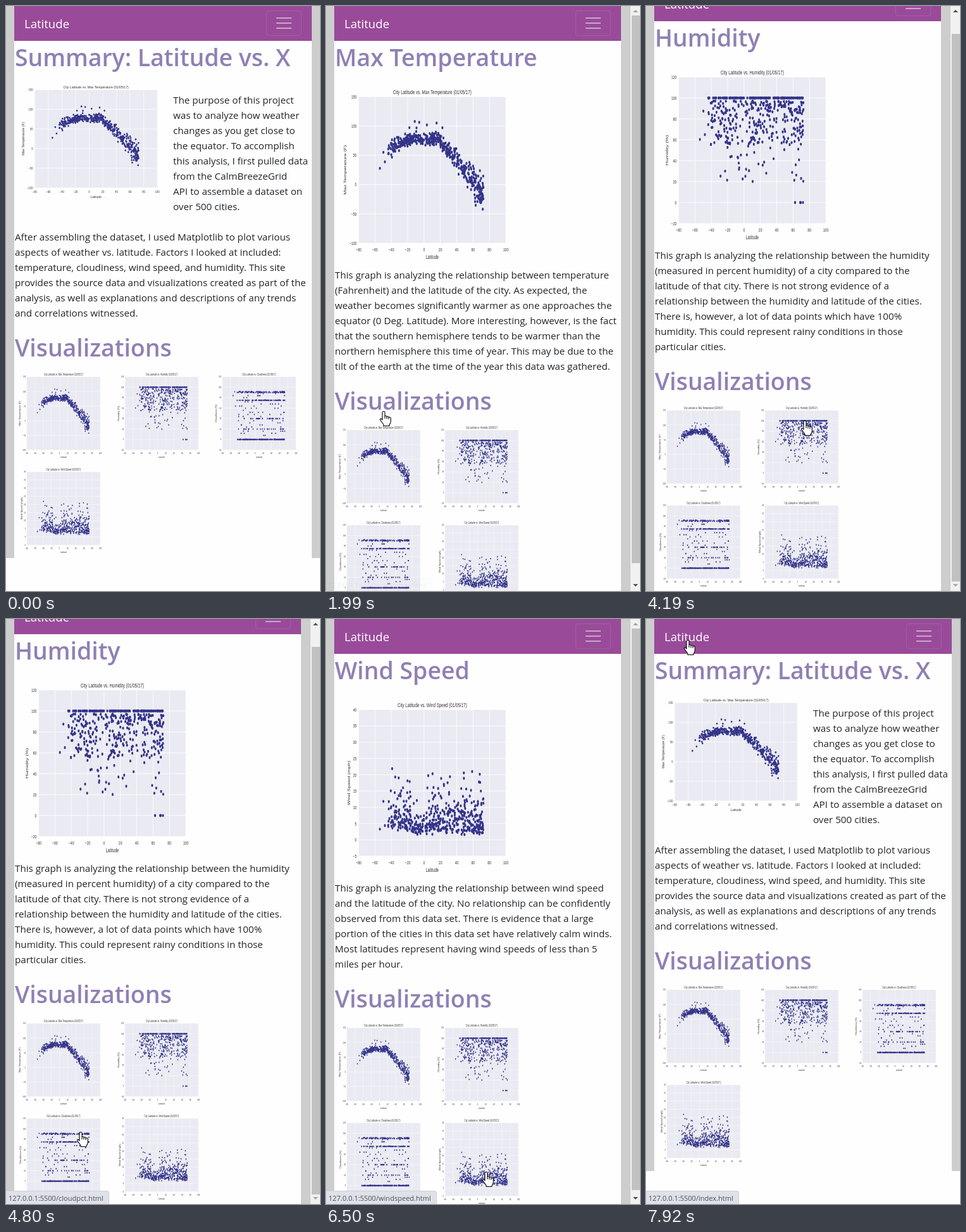
An HTML page that plays this animation: 496x923 px, repeating every 8 s.

```html
<!DOCTYPE html>
<html lang="en">
<head>
<meta charset="utf-8">
<title>Latitude</title>
<style>
html, body { margin: 0; width: 100%; height: 100%; overflow: hidden; background: #fefefe; }
#stage { position: relative; width: 496px; height: 923px; overflow: hidden; background: #fefefe;
  font: 15.2px/24px "Open Sans", "Noto Sans", sans-serif; color: #212529; }
#stage div, #stage svg { position: absolute; white-space: nowrap; }
.page { left: 0; top: 0; width: 496px; height: 1000px; }
.side { top: 0; background: #cdcdcd; }
.nav { left: 13px; top: 0; height: 55px; background: #994b99; }
.brand { left: 16px; top: 12.7px; font-size: 18.6px; line-height: 30px; color: #fff; }
.toggle { right: 16px; top: 7px; width: 54px; height: 38px; border: 1px solid rgba(255,255,255,.1); border-radius: 4px; }
.toggle div { left: 15px; width: 24px; height: 2px; background: rgba(255,255,255,.5); }
.h { left: 14px; font-size: 37.4px; line-height: 48px; font-weight: 600; color: #9080b4; }
#bar { left: 481px; top: 0; width: 15px; height: 923px; background: #f1f1f1; }
#thumb { left: 2px; width: 13px; background: #c1c1c1; }
#status { left: 0; top: 902px; height: 21px; padding: 0 8px 0 4px; background: #dee2e8;
  border: 1px solid #cfd2d8; border-width: 1px 1px 0 0; border-radius: 0 4px 0 0; box-sizing: border-box;
  font-size: 11.05px; line-height: 21px; color: #4d5156; }
#over { left: 0; top: 0; }
</style>
</head>
<body>
<div id="stage"></div>
<script>
const LOOP = 8000;
const stage = document.getElementById('stage');
const clamp = (v, a, b) => Math.min(b, Math.max(a, v));

// --- weather data -------------------------------------------------
let seed = 20170;
const rnd = () => {
  seed = (seed + 0x6D2B79F5) | 0;
  let v = Math.imul(seed ^ (seed >>> 15), 1 | seed);
  v = (v + Math.imul(v ^ (v >>> 7), 61 | v)) ^ v;
  return ((v ^ (v >>> 14)) >>> 0) / 4294967296;
};
const gauss = () => (rnd() + rnd() + rnd() + rnd() - 2) * 1.73;

function latitude() {
  return rnd() < .4 ? clamp(-15 + 17 * gauss(), -55, 20) : 73 - 68 * Math.pow(rnd(), 1.15);
}

function warmth(lat) {
  const north = Math.max(0, lat - 18), south = Math.max(0, -10 - lat);
  const odd = rnd() < .02 ? 25 : 0;
  return 78 - 1.75 * north - .018 * south * south + (5 + .17 * north + .08 * south) * gauss() + odd;
}

function moisture(lat) {
  if (lat > 62 && rnd() < .1) return 0;
  const r = rnd();
  return r < .27 && lat > -47 ? 100 : r < .93 ? 97 - 42 * Math.pow(rnd(), 1.4) : 20 + 38 * rnd();
}

function cover() {
  const r = rnd();
  if (r < .34) return 0;
  if (r < .5) return 75;
  if (r < .68) return 90 + Math.round(rnd()) * 1.5;
  if (r < .75) return r < .715 ? 20 : 40;
  return 4 * Math.floor(2 + 22 * rnd());
}

function breeze(lat) {
  const calm = Math.abs(lat + 6) < 10;
  const gale = lat > 45 && rnd() < .05 ? 12 * rnd() + 6 : 0;
  return (lat < -16 ? 2.6 : 1.4) + 1.6 * rnd() - (calm ? 2.6 : 4.8) * Math.log(1 - .98 * rnd()) + gale;
}

const cities = Array.from({ length: 490 }, latitude);

// --- charts -------------------------------------------------------
const AX = { l: 54, r: 388.8, t: 34.6, b: 256.4 };
const CHARTS = [
  { name: 'Max Temperature', unit: 'F', lo: -100, hi: 150, step: 50, yx: 26, value: warmth },
  { name: 'Humidity', unit: '%', lo: -20, hi: 120, step: 20, yx: 30, value: moisture },
  { name: 'Cloudiness', unit: '%', lo: -20, hi: 120, step: 20, yx: 30, value: cover },
  { name: 'Wind Speed', unit: 'mph', lo: -5, hi: 40, step: 5, yx: 34, value: breeze }
];

function symbol(c, id) {
  const px = v => (AX.l + (v + 80) / 180 * (AX.r - AX.l)).toFixed(1);
  const py = v => (AX.b - (v - c.lo) / (c.hi - c.lo) * (AX.b - AX.t)).toFixed(1);
  const label = v => String(v).replace('-', '\u2212');
  let grid = '', ticks = '';
  for (let v = -80; v <= 100; v += 20) {
    grid += `M${px(v)} ${AX.t}V${AX.b}`;
    ticks += `<text x="${px(v)}" y="268.5" text-anchor="middle">${label(v)}</text>`;
  }
  for (let v = c.lo; v <= c.hi; v += c.step) {
    grid += `M${AX.l} ${py(v)}H${AX.r}`;
    ticks += `<text x="49.5" y="${+py(v) + 2.7}" text-anchor="end">${label(v)}</text>`;
  }
  const dots = cities.map(lat => `M${px(lat)} ${py(c.value(lat))}h.01`).join('');
  return `<symbol id="chart${id}" viewBox="0 0 432 288" preserveAspectRatio="none">
    <rect x="${AX.l}" y="${AX.t}" width="${AX.r - AX.l}" height="${AX.b - AX.t}" fill="#eaeaf2"/>
    <path d="${grid}" stroke="#fff" stroke-width=".9"/>
    <path d="${dots}" fill="none" stroke="#0c0c74" stroke-opacity=".82" stroke-width="4.5" stroke-linecap="round"/>
    <g font-family="Liberation Sans, Arial, sans-serif" fill="#333" font-size="7.3">${ticks}
    <text x="221.4" y="31" font-size="8.95" text-anchor="middle">City Latitude vs. ${c.name} (01/05/17)</text>
    <text x="221.4" y="280" font-size="8.4" text-anchor="middle">Latitude</text>
    <text transform="translate(${c.yx} 145.5) rotate(-90)" font-size="8.1" text-anchor="middle">${c.name} (${c.unit})</text></g>
  </symbol>`;
}

const plot = (i, x, y, w, h) =>
  `<svg style="left:${x}px;top:${y}px" width="${w}" height="${h}"><use href="#chart${i}" width="${w}" height="${h}"/></svg>`;

// --- pages --------------------------------------------------------
const heading = (text, mid) => `<div class="h" style="top:${mid - 25}px">${text}</div>`;
const para = (lines, x, y) => `<div style="left:${x}px;top:${y}px">${lines.join('<br>')}</div>`;

function frame(right, height) {
  const bars = [10, 18, 26].map(y => `<div style="top:${y}px"></div>`).join('');
  return `<div class="side" style="left:0;width:13px;height:${height}px"></div>
    <div class="side" style="left:${right}px;width:${right > 480 ? 13 : 15}px;height:${height}px"></div>
    <div class="nav" style="width:${right - 13}px"><div class="brand">Latitude</div><div class="toggle">${bars}</div></div>`;
}

function gallery(end, cols) {
  const cells = CHARTS.map((c, i) =>
    plot(i, 14 + 154.5 * (i % cols), end + 70.5 + 150 * Math.floor(i / cols), 150, 150));
  return heading('Visualizations', end + 44) + cells.join('');
}

const summary = frame(483, 871) + heading('Summary: Latitude vs. X', 82) + plot(0, 14, 108, 250, 201) + para([
  'The purpose of this project', 'was to analyze how weather', 'changes as you get close to', 'the equator. To accomplish',
  'this analysis, I first pulled data', 'from the CalmBreezeGrid', 'API to assemble a dataset on', 'over 500 cities.'
], 264, 136) + para([
  'After assembling the dataset, I used Matplotlib to plot various', 'aspects of weather vs. latitude. Factors I looked at included:',
  'temperature, cloudiness, wind speed, and humidity. This site', 'provides the source data and visualizations created as part of the',
  'analysis, as well as explanations and descriptions of any trends', 'and correlations witnessed.'
], 14, 352) + gallery(496, 3);

const TEXTS = [[
  'This graph is analyzing the relationship between temperature', '(Fahrenheit) and the latitude of the city. As expected, the',
  'weather becomes significantly warmer as one approaches the', 'equator (0 Deg. Latitude). More interesting, however, is the fact',
  'that the southern hemisphere tends to be warmer than the', 'northern hemisphere this time of year. This may be due to the',
  'tilt of the earth at the time of the year this data was gathered.'
], [
  'This graph is analyzing the relationship between the humidity', '(measured in percent humidity) of a city compared to the',
  'latitude of that city. There is not strong evidence of a', 'relationship between the humidity and latitude of the cities.',
  'There is, however, a lot of data points which have 100%', 'humidity. This could represent rainy conditions in those', 'particular cities.'
], [
  'This graph is analyzing the relationship between the Cloudiness', 'percent and the latitude of the city. There is evidence of a weak',
  'positive correlation between cloudiness percent and latitude. A', 'large section of the data points are either above 75%',
  'cloudiness or are around 0% cloudiness. This suggests that if', 'there are not totally clear skies that there is a higher frequency',
  'of overcast or mostly-cloudy skies as opposed to partly-cloudy', 'skies.'
], [
  'This graph is analyzing the relationship between wind speed', 'and the latitude of the city. No relationship can be confidently',
  'observed from this data set. There is evidence that a large', 'portion of the cities in this data set have relatively calm winds.',
  'Most latitudes represent having wind speeds of less than 5', 'miles per hour.'
]];

const detail = (lines, i) => frame(466, 1000) + heading(CHARTS[i].name, 82) + plot(i, 14, 106.5, 300, 300)
  + para(lines, 14, 412) + gallery(412 + 24 * lines.length, 2);

const HAND = 'M-2 14V2Q-2 .5 0 .5Q2 .5 2 2V7.6Q4.3 7 5 8.8Q7.3 8 8 9.8Q11 9.2 11.3 11.5V16.5Q11 19.5 9 22V23.5H0V21.5L-5.5 14Q-5.6 11.6 -3.6 12.3Z';
const GRIP = 'M2 7.6V12M5 8.8V12.4M8 9.8V13';
const ARROW = 'M.5 .5V16.5L4.2 13L6.6 18.6L9 17.6L6.7 12.1H11.7Z';

stage.innerHTML = `<svg width="0" height="0">${CHARTS.map(symbol).join('')}</svg>`
  + [summary, ...TEXTS.map(detail)].map(p => `<div class="page">${p}</div>`).join('')
  + `<div id="bar"><div id="thumb"></div><svg width="15" height="923"><path id="up" d="M4 10H12L8 6Z"/><path id="down" d="M4 912H12L8 916Z"/></svg></div>
  <div id="status"></div>
  <svg id="over" width="496" height="923"><circle id="click" r="15" fill="#ff0" fill-opacity=".47"/>
  <g id="cursor" stroke="#000" stroke-width="1.1" stroke-linejoin="round" fill="#fff">
  <g id="hand"><path d="${HAND}"/><path d="${GRIP}"/></g><path id="arrow" d="${ARROW}"/></g></svg>`;

const el = id => document.getElementById(id);
const pages = [...document.querySelectorAll('.page')];

// --- timeline -----------------------------------------------------
// Each visit: the pointer travels, rests on a link, clicks, and a page loads.
const VISITS = [
  { file: 'maxtemp', page: 1, from: 450, to: 1220, hover: 1300, click: 1375, up: 1450, load: 1620,
    way: [[0, 471, 900], [1, 91, 639]], arrow: [0, .75] },
  { file: 'humidity', page: 2, from: 2370, to: 2550, hover: 2720, click: 3020, up: 3180, load: 3180,
    way: [[0, 91, 639], [1, 250, 731]] },
  { file: 'cloudpct', page: 3, from: 3790, to: 4560, hover: 4650, click: 4725, up: 4800, load: 4950,
    way: [[0, 250, 731], [.4, 251, 654], [.6, 251, 654], [1, 118, 809]], scroll: 31 },
  { file: 'windspeed', page: 4, from: 5410, to: 6210, hover: 5700, click: 6270, up: 6420, load: 6420,
    way: [[0, 118, 809], [.14, 185, 758], [.27, 228, 841], [1, 253, 872]] },
  { file: 'index', page: 0, from: 6740, to: 7530, hover: 7620, click: 7695, up: 7770, load: 7845,
    way: [[0, 253, 872], [.35, 313, 560], [1, 66, 33]], arrow: [.2, .95] }
];
const FADE = 140, LINGER = 240, BEAT = 80;

// the pointer advances in even steps of about one beat
function progress(v, t) {
  const steps = Math.round((v.to - v.from) / BEAT) + 1;
  return Math.min(steps, Math.floor((t - v.from) / (v.to - v.from) * (steps - 1) + 1e-6) + 1) / steps;
}

function pointAt(way, p) {
  const i = way.findIndex((w, k) => k && p <= w[0]);
  const [a, b] = [way[i - 1], way[i]];
  const f = (p - a[0]) / (b[0] - a[0]);
  return [1, 2].map(k => a[k] + (b[k] - a[k]) * f);
}

const show = (node, on) => { node.style.display = on ? '' : 'none'; };

function drawBar(page, scroll) {
  show(el('bar'), page > 0);
  if (!page) return;
  const extra = 31 + 24 * (TEXTS[page - 1].length - 7), total = 923 + extra;
  el('thumb').style.top = 15 + scroll / total * 893 + 'px';
  el('thumb').style.height = 893 * 923 / total + 'px';
  el('up').setAttribute('fill', scroll > 0 ? '#505050' : '#a3a3a3');
  el('down').setAttribute('fill', scroll < extra ? '#505050' : '#a3a3a3');
}

function drawStatus(t) {
  const v = VISITS.find(v => t >= v.hover && t < v.load + LINGER + FADE);
  show(el('status'), v);
  if (!v) return;
  el('status').textContent = `127.0.0.1:5500/${v.file}.html`;
  el('status').style.opacity = clamp(Math.min(t - v.hover, v.load + LINGER + FADE - t) / FADE, 0, 1);
}

function drawPointer(v, t) {
  show(el('over'), v);
  if (!v) return;
  const p = progress(v, t), [x, y] = pointAt(v.way, p);
  const arrow = v.arrow && p > v.arrow[0] && p < v.arrow[1];
  show(el('arrow'), arrow);
  show(el('hand'), !arrow);
  el('cursor').setAttribute('transform', `translate(${x} ${y})`);
  el('click').setAttribute('cx', x);
  el('click').setAttribute('cy', y);
  show(el('click'), t >= v.click && t < v.up);
}

function draw(t) {
  const visit = VISITS.filter(v => v.from <= t).pop();
  const loaded = VISITS.filter(v => v.load <= t).pop();
  const page = loaded ? loaded.page : 0;
  const scroll = visit && visit.scroll && t < visit.load
    ? visit.scroll * clamp((progress(visit, t) - .15) / .35, 0, 1) : 0;
  pages.forEach((p, i) => {
    show(p, i === page);
    p.style.top = -scroll + 'px';
  });
  drawBar(page, scroll);
  drawStatus(t);
  drawPointer(visit, t);
}

const start = performance.now();
function tick() {
  draw((performance.now() - start) % LOOP);
  requestAnimationFrame(tick);
}
tick();
</script>
</body>
</html>
```
